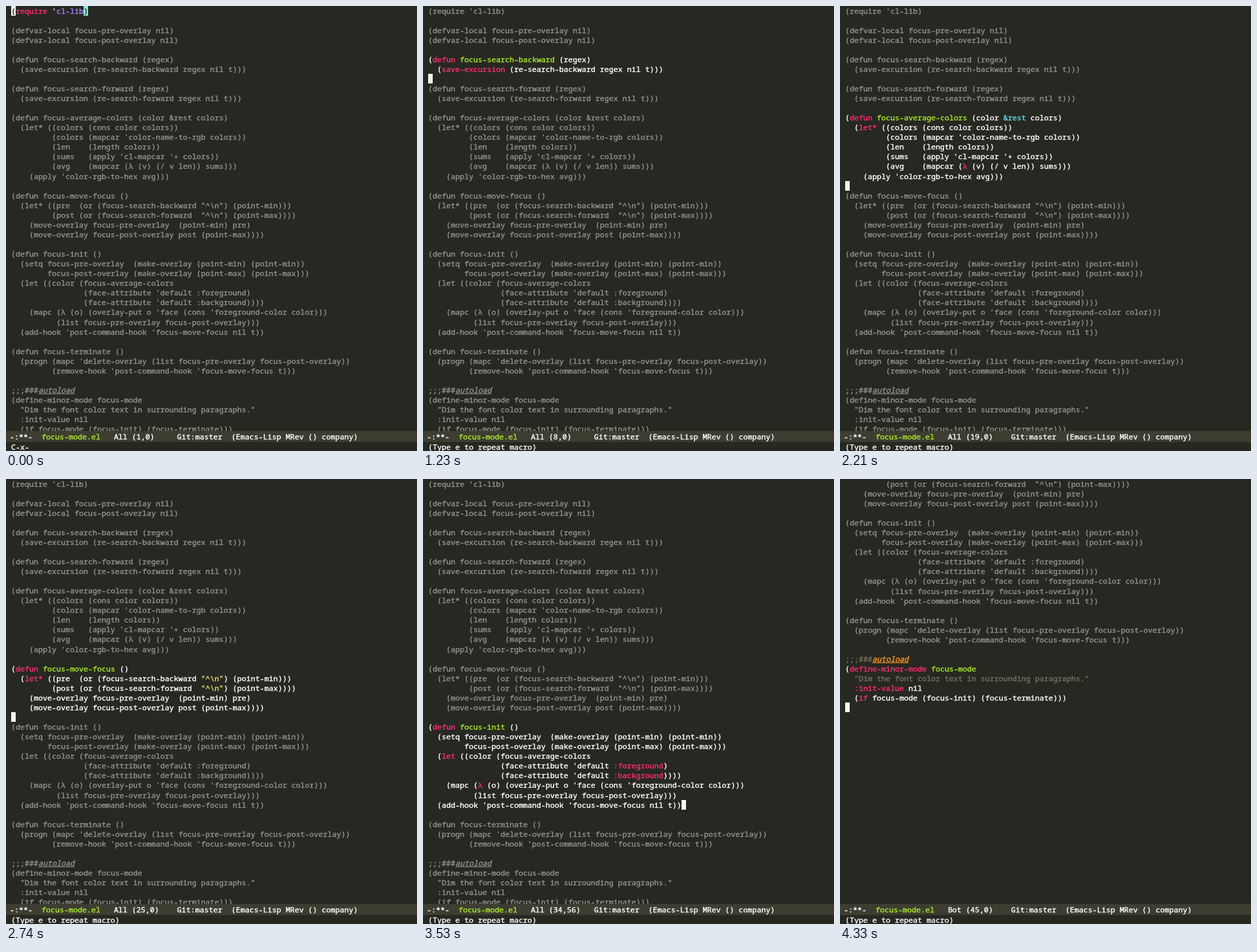
These frames come from a looping animation (636 px wide and 689 px high, 4.42 s). An HTML page:

```html
<!DOCTYPE html>
<html lang="en">
<head>
<meta charset="utf-8">
<title>focus-mode.el</title>
<style>
html, body { margin: 0; width: 100%; height: 100%; overflow: hidden; background: #272822; }
body { position: relative; color: #fff; }
div { position: absolute; white-space: pre; font: 11.667px/15px "Noto Sans Mono", "DejaVu Sans Mono", monospace; font-variant-ligatures: none; -webkit-text-stroke: .4px; }
#view { left: 0; top: 0; width: 100%; height: 658px; overflow: hidden; }
#text { left: 8px; top: 0; }
.row { left: 0; color: #93938d; }
.row .auto { font-style: italic; text-decoration: underline; }
.row.lit { color: #fff; }
.lit .key { color: #fb2c72; }
.lit .name { color: #a8e92f; }
.lit .var, .lit .auto { color: #fd971f; }
.lit .const { color: #ae81ff; }
.lit .type { color: #66d9ef; }
.lit .str { color: #e6db74; }
.lit .doc { color: #75715e; }
.cell { width: 7px; height: 15px; color: #272822; background: #8ce8dc; }
#cursor { background: #f8f8f0; }
#mode { left: 0; top: 658px; width: 100%; height: 17px; background: #3e3d31; }
#mode div { left: 6px; top: 1px; }
#file { color: #a8e92f; }
#echo { left: 0; top: 675px; width: 100%; height: 14px; overflow: hidden; }
#echo div { left: 8px; top: 0; }
</style>
</head>
<body>
<div id="view"><div id="text"></div></div>
<div id="mode"><div>-:**-  <span id="file">focus-mode.el</span>   <span id="pos"></span>Git:master  (Emacs-Lisp MRev () company)</div></div>
<div id="echo"><div id="msg"></div></div>
<script>
const code = String.raw`(require 'cl-lib)

(defvar-local focus-pre-overlay nil)
(defvar-local focus-post-overlay nil)

(defun focus-search-backward (regex)
  (save-excursion (re-search-backward regex nil t)))

(defun focus-search-forward (regex)
  (save-excursion (re-search-forward regex nil t)))

(defun focus-average-colors (color &rest colors)
  (let* ((colors (cons color colors))
         (colors (mapcar 'color-name-to-rgb colors))
         (len    (length colors))
         (sums   (apply 'cl-mapcar '+ colors))
         (avg    (mapcar (λ (v) (/ v len)) sums)))
    (apply 'color-rgb-to-hex avg)))

(defun focus-move-focus ()
  (let* ((pre  (or (focus-search-backward "^\n") (point-min)))
         (post (or (focus-search-forward  "^\n") (point-max))))
    (move-overlay focus-pre-overlay  (point-min) pre)
    (move-overlay focus-post-overlay post (point-max))))

(defun focus-init ()
  (setq focus-pre-overlay  (make-overlay (point-min) (point-min))
        focus-post-overlay (make-overlay (point-max) (point-max)))
  (let ((color (focus-average-colors
                (face-attribute 'default :foreground)
                (face-attribute 'default :background))))
    (mapc (λ (o) (overlay-put o 'face (cons 'foreground-color color)))
          (list focus-pre-overlay focus-post-overlay)))
  (add-hook 'post-command-hook 'focus-move-focus nil t))

(defun focus-terminate ()
  (progn (mapc 'delete-overlay (list focus-pre-overlay focus-post-overlay))
         (remove-hook 'post-command-hook 'focus-move-focus t)))

;;;###autoload
(define-minor-mode focus-mode
  "Dim the font color text in surrounding paragraphs."
  :init-value nil
  (if focus-mode (focus-init) (focus-terminate)))
`;
const LOOP = 4420, ROW = 15, COL = 7, SCROLL_TOP = 22;
const lines = code.split("\n");
const $ = id => document.getElementById(id);

const syntax = new RegExp([
  /(?<doc>"Dim[^"]*"|;;;###)/,
  /(?<str>"[^"]*")/,
  /(?<auto>autoload$)/,
  /(?<name>(?<=\((?:defun|define-minor-mode) )[\w-]+)/,
  /(?<var>(?<=\(defvar-local )[\w-]+)/,
  /(?<const>(?<=require ')cl-lib)/,
  /(?<type>&rest)/,
  /(?<key>λ|:[\w-]+|(?<=\()(?:require|defvar-local|defun|save-excursion|let\*?|progn|define-minor-mode|if)(?= ))/
].map(r => r.source).join("|"), "g");

function escape(s) {
  return s.replace(/&/g, "&amp;").replace(/</g, "&lt;");
}

function paint(line) {
  let html = "", end = 0;
  for (const m of line.matchAll(syntax)) {
    const kind = Object.keys(m.groups).find(k => m.groups[k]);
    html += escape(line.slice(end, m.index)) + `<span class="${kind}">${escape(m[0])}</span>`;
    end = m.index + m[0].length;
  }
  return html + escape(line.slice(end));
}

function add(cls) {
  const el = document.createElement("div");
  el.className = cls;
  $("text").append(el);
  return el;
}

// Rows holding a lambda are one pixel taller.
const tops = [];
let y = 0;
const rows = lines.map(line => {
  const el = add("row");
  el.innerHTML = paint(line);
  el.style.top = y + "px";
  tops.push(y);
  y += ROW + line.includes("λ");
  return el;
});

const parens = [0, 16].map(col => {
  const el = add("cell");
  el.textContent = lines[0][col];
  el.style.left = col * COL + "px";
  return el;
});
const cursor = add("cell");
cursor.id = "cursor";

// [time, line] of each cursor move
const moves = [[0, 1], [350, 2], [790, 3], [880, 4], [970, 5], [1060, 6],
  [1230, 8], [1320, 9], [1410, 10], [1500, 11]];
let next = 14;
for (let start = 1770; start < LOOP; start += 530) {
  for (const dt of [0, 90, 180, 260, 350, 440]) {
    if (next === 27 || next === 42) next++;
    moves.push([start + dt, next++]);
  }
}

function focusRange(at) {
  let from = at - 1, to = at;
  while (from > 0 && lines[from - 1]) from--;
  while (to < lines.length && lines[to - 1]) to++;
  return [from, to];
}

function draw(t) {
  const at = moves.findLast(m => m[0] <= t)[1];
  const col = at === 1 ? 0 : lines[at - 1].length;
  const scrolled = at >= 44;
  const [from, to] = focusRange(at);

  rows.forEach((el, i) => el.classList.toggle("lit", i + 1 >= from && i + 1 <= to));
  $("text").style.top = (scrolled ? -tops[SCROLL_TOP - 1] : 0) + "px";
  cursor.style.left = col * COL + "px";
  cursor.style.top = tops[at - 1] + "px";
  cursor.textContent = lines[at - 1][col] || "";
  parens.forEach(el => el.style.visibility = t < 440 ? "visible" : "hidden");

  $("pos").textContent = (scrolled ? "Bot " : "All ") + `(${at},${col})`.padEnd(10);
  $("msg").textContent = t < 350 ? "C-x-" : t < 790 ? "" : "(Type e to repeat macro)";
}

const begin = performance.now();
function tick() {
  draw((performance.now() - begin) % LOOP);
  requestAnimationFrame(tick);
}
tick();
</script>
</body>
</html>
```
